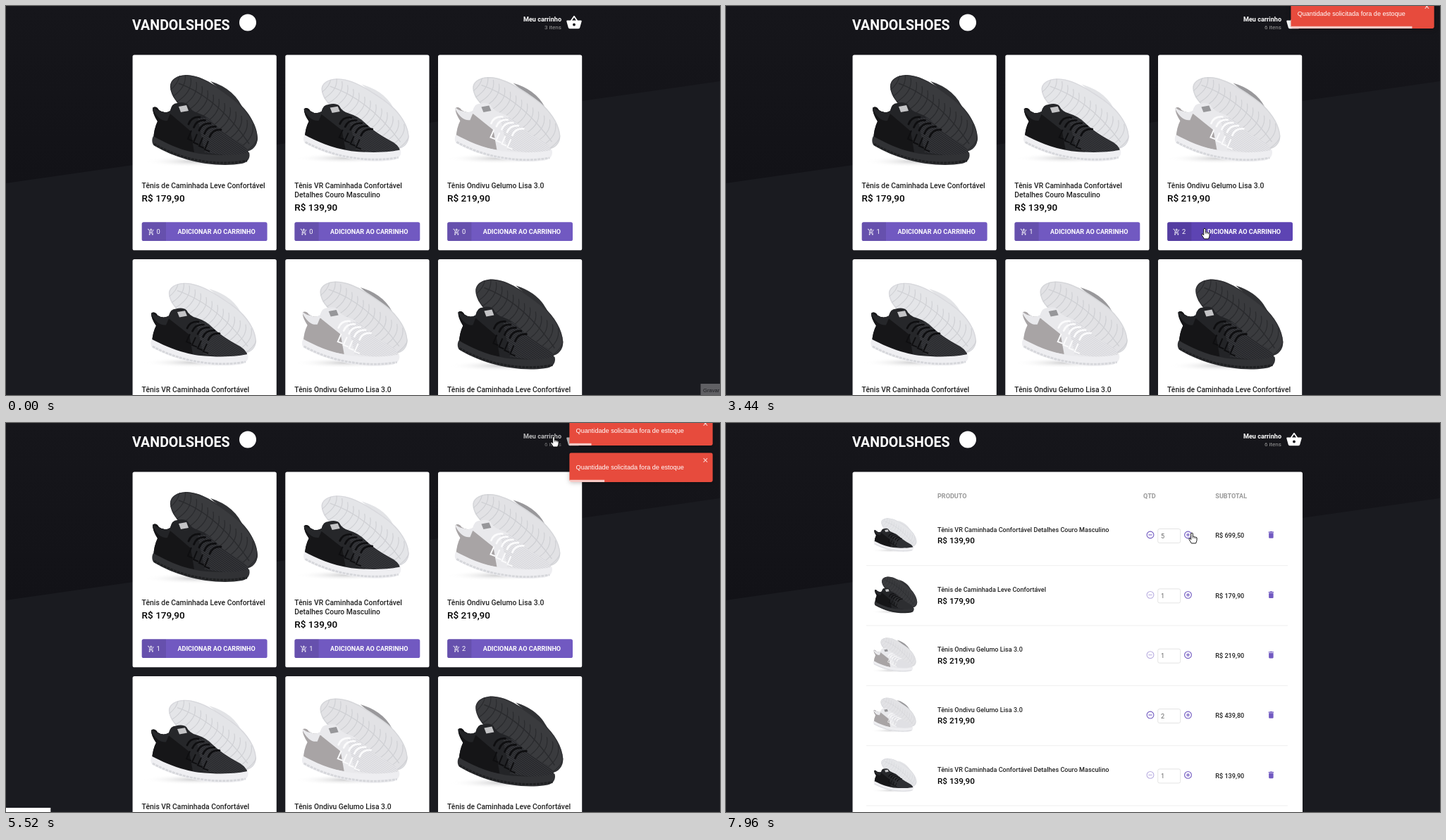
Write an HTML page that moves like this. It is 1013x553 px and loops after 8 s.

```html
<!DOCTYPE html>
<html lang="pt-BR">
<head>
<meta charset="utf-8">
<title>Loja de tênis</title>
<style>
  html, body { margin: 0; width: 100%; height: 100%; overflow: hidden; background: #1a1b20; }
  svg { display: block; width: 100vw; height: 100vh; }
  text { font-family: Roboto, sans-serif; white-space: pre; }
  .plain { font-family: "Liberation Sans", Arial, sans-serif; }
  .black { --sole: #3a3b3e; --groove: #2a2b2e; --edge: #303134; --upper: #232427; --panel: #151517; --mid: #313235; --tread: #1f2022; --lace: #0e0e10; --label: #c4c4c6; }
  .mixed { --sole: #e4e5e8; --groove: #d0d1d5; --edge: #e2e3e6; --upper: #26272a; --panel: #161618; --mid: #efeff2; --tread: #d6d7db; --lace: #0e0e10; --label: #c4c4c6; }
  .white { --sole: #e2e2e5; --groove: #cfd0d4; --edge: #99989b; --upper: #e9e9ec; --panel: #a8a4a5; --mid: #eeeef1; --tread: #d6d7db; --lace: #fbfbfc; --label: #97979a; }
</style>
</head>
<body>
<svg id="stage" viewBox="0 0 1013 553" preserveAspectRatio="none"></svg>
<script>
const LOOP = 8000, PURPLE = '#7159c1', PURPLE_HOVER = '#5d44b3';
const CARD_X = [180, 396.7, 613.4];
const $ = id => document.getElementById(id);
const repeat = (n, draw) => Array.from({ length: n }, (_, i) => draw(i)).join('');
const text = (x, y, value, size, { weight = 400, fill = '#222', more = '' } = {}) =>
  `<text x="${x}" y="${y}" font-size="${size}" font-weight="${weight}" fill="${fill}" ${more}>${value}</text>`;

// "photo" is the framing of the shoe inside its picture
const products = {
  black: { lines: ['Tênis de Caminhada Leve Confortável'], price: 'R$ 179,90', photo: '' },
  mixed: { lines: ['Tênis VR Caminhada Confortável', 'Detalhes Couro Masculino'], price: 'R$ 139,90', photo: 'translate(-2 13) scale(1 .92)' },
  white: { lines: ['Tênis Ondivu Gelumo Lisa 3.0'], price: 'R$ 219,90', photo: 'translate(-4 9) scale(1 .94)' },
};

const soleShape = 'M233 116C232 105 242 98 257 98C280 99 303 117 322 131C342 146 356 168 357 187C357 198 350 206 340 207C310 198 280 178 262 158C246 140 235 132 233 116Z';
const upperShape = 'M208 145Q213 141 217 148Q225 154 233 149Q235 138 243 138Q253 135 258 140Q262 149 272 152Q287 157 296 168Q310 182 329 193Q343 200 345 211L338 216Q270 222 209 190Q210 174 215 164Q208 153 208 145Z';

const defs = `<defs>
  <linearGradient id="top" x2="0" y2="1"><stop stop-color="#16161b"/><stop offset="1" stop-color="#121217"/></linearGradient>
  <radialGradient id="shade"><stop stop-color="#55555a" stop-opacity=".28"/><stop offset="1" stop-color="#fff" stop-opacity="0"/></radialGradient>
  <pattern id="mesh" width="2.4" height="2.4" patternUnits="userSpaceOnUse" patternTransform="rotate(35)">
    <path d="M0 1H2.4" stroke="#888b90" stroke-width=".7" opacity=".35"/></pattern>
  <clipPath id="soleClip"><path d="${soleShape}"/></clipPath>
  <clipPath id="upperClip"><path d="${upperShape}"/></clipPath>
  <filter id="drop" x="-10%" y="-30%" width="120%" height="170%"><feDropShadow dx="0" dy="1" stdDeviation="3" flood-opacity=".25"/></filter>
  <g id="shoe" fill="none">
    <ellipse cx="268" cy="221" rx="72" ry="8" fill="url(#shade)"/>
    <path d="M290 107Q326 118 338 150Z" fill="var(--edge)"/>
    <path d="${soleShape}" fill="var(--sole)"/>
    <g clip-path="url(#soleClip)" stroke="var(--groove)">
      ${repeat(17, i => `<path d="M${246 + i * 8} ${90 + i * 6}q4 22-26 38" stroke-width="1.2"/>`)}
      <path d="M245 110Q300 130 345 196" stroke-width="1.4"/>
      <path d="${soleShape}" stroke-width="3" opacity=".6"/>
    </g>
    <path d="${upperShape}" fill="var(--upper)"/>
    <g clip-path="url(#upperClip)">
      <path d="M272 160L290 158L350 205L338 216L282 208Z" fill="url(#mesh)"/>
      <path d="M205 140L234 154L262 178L267 208L200 195Z" fill="var(--panel)"/>
      <path d="M206 142Q220 156 236 145L229 163Q216 165 206 142Z" fill="var(--upper)"/>
      ${repeat(4, i => `<path d="M${263 + i * 8} ${177 + i * 5}l-5 12l7 3" stroke="var(--lace)" stroke-width="2"/>`)}
    </g>
    ${repeat(5, i => `<path d="M${259 + i * 7.5} ${168 + i * 4.5}q4-11 16-10" stroke="var(--lace)" stroke-width="2.8" stroke-linecap="round"/>`)}
    <path d="M245 143l11-2 3 8-11 2Z" fill="var(--label)"/>
    <path d="M209 185C225 194 246 205 275 210C310 214 335 211 345 208C347 215 344 222 335 224C300 230 250 222 211 199C206 196 207 188 209 185Z" fill="var(--mid)"/>
    <path d="M210 196C250 220 300 228 342 220" stroke="var(--tread)" stroke-width="3" stroke-dasharray="4 1.2"/>
  </g>
  <g id="cart" fill="none" stroke="#fff" stroke-width="2">
    <path d="M1 3H4L8.3 12H16L20.3 4.4M8 12L6 16H19M12 1V9M8 5H16"/>
    <g fill="#fff" stroke="none"><circle cx="7" cy="20" r="2"/><circle cx="17" cy="20" r="2"/></g>
  </g>
  <g id="trash" fill="${PURPLE}"><path d="M6 7H18V19Q18 21 16 21H8Q6 21 6 19ZM5 4H8.5L9.5 3H14.5L15.5 4H19V6H5Z"/></g>
  <g id="ring" fill="none" stroke="${PURPLE}" stroke-width="1.1"><circle r="4.9"/><path d="M-2.6 0H2.6"/></g>
</defs>`;

const header = `
  ${text(179, 34, 'VANDOLSHOES', 19.6, { weight: 700, fill: '#fff' })}
  <circle cx="343" cy="23.5" r="12" fill="#fff"/>
  <g id="cartLink">
    ${text(788, 21.8, 'Meu carrinho', 9.05, { weight: 700, fill: '#fff', more: 'text-anchor="end"' })}
    ${text(788, 32.5, '', 8.1, { fill: '#999', more: 'text-anchor="end" id="items"' })}
    <path transform="translate(794.3 11.8) scale(.975)" fill="#fff" fill-rule="evenodd"
      d="M17.2 9L12.8 2.4Q12 1.6 11.2 2.4L6.8 9H2Q1 9 1 10.3L3.6 19.5Q4 21 5.5 21H18.5Q20 21 20.4 19.5L23 10.3Q23 9 22 9ZM9 9L12 4.6L15 9ZM12 17A2 2 0 1 1 12 13A2 2 0 1 1 12 17Z"/>
  </g>`;

const shoe = (kind, place) =>
  `<g transform="${place}"><use href="#shoe" class="${kind}" transform="${products[kind].photo}"/></g>`;

function card(kind, i) {
  const x = CARD_X[i % 3], y = i < 3 ? 70 : 360.5;
  const { lines, price } = products[kind];
  const shift = (lines.length - 1) * 13;
  return `<g transform="translate(${x} ${y})">
    <rect x="-.4" y="-.5" width="204.2" height="277.8" rx="2.6" fill="#fff"/>
    ${shoe(kind, 'translate(-180 -70)')}
    ${lines.map((line, n) => text(12.6, 188.7 + n * 13, line, 10.35, { weight: 500 })).join('')}
    ${text(12.6, 208.2 + shift, price, 13.55, { weight: 500, fill: '#000' })}
    <rect id="button${i}" x="12.7" y="237.3" width="177.9" height="26.8" rx="2.6" fill="${PURPLE}"/>
    <path d="M15.3 237.3H47V264.1H15.3Q12.7 264.1 12.7 261.5V239.9Q12.7 237.3 15.3 237.3Z" opacity=".1"/>
    <use href="#cart" transform="translate(20.6 246) scale(.433)"/>
    ${text(33.6, 254, '0', 9.3, { fill: '#fff', more: `id="count${i}"` })}
    ${text(118.6, 254, 'ADICIONAR AO CARRINHO', 9.1, { weight: 700, fill: '#fff', more: 'text-anchor="middle"' })}
  </g>`;
}

function cartRow([kind, amount, subtotal], i) {
  const { lines, price } = products[kind];
  return `<g transform="translate(0 ${i * 85.35})">
    ${shoe(kind, 'translate(240.5 159.5) scale(.405) translate(-281 -163)')}
    ${text(300, 154.5, lines.join(' '), 9.1, { weight: 500 })}
    ${text(300, 171.4, price, 11.75, { weight: 500, fill: '#000' })}
    <use href="#ring" x="602" y="159" opacity="${amount > 1 ? 1 : .5}"/>
    <rect x="612.7" y="150.5" width="32" height="20" rx="2.4" fill="#fff" stroke="#ddd" stroke-width=".8"/>
    ${text(617, 163.7, amount, 9.1, { fill: '#666' })}
    <use href="#ring" x="655.5" y="159"/><path d="M655.5 156.4v5.2" stroke="${PURPLE}" stroke-width="1.1"/>
    ${text(694.3, 163.4, subtotal, 9.1, { weight: 500 })}
    <use href="#trash" transform="translate(766.9 152.4) scale(.54)"/>
    <path d="M199 202.6H797" stroke="#eee" stroke-width=".9"/>
  </g>`;
}

const cartRows = [
  ['mixed', 5, 'R$ 699,50'], ['black', 1, 'R$ 179,90'], ['white', 1, 'R$ 219,90'],
  ['white', 2, 'R$ 439,80'], ['mixed', 1, 'R$ 139,90'],
];
const columnTitle = { weight: 700, fill: '#999' };
const cartPage = `<rect x="179.6" y="69.5" width="638.4" height="500" rx="2.6" fill="#fff"/>
  ${text(300, 107, 'PRODUTO', 9.1, columnTitle)}${text(592, 107, 'QTD', 9.1, columnTitle)}${text(694.3, 107, 'SUBTOTAL', 9.1, columnTitle)}
  ${cartRows.map(cartRow).join('')}`;

const toast = (id, y) => `<g id="${id}"><g transform="translate(799.4 ${y})">
    <rect width="203.2" height="41.6" rx="2.4" fill="#e74c3c" filter="url(#drop)"/>
    ${text(9.2, 24, 'Quantidade solicitada fora de estoque', 9.1, { fill: '#fff', more: 'class="plain"' })}
    <path d="M190.2 7.8l5.4 5.4m0-5.4l-5.4 5.4" stroke="#fff" stroke-width="1.1" opacity=".75"/>
    <rect id="${id}Bar" y="38.4" height="3.2" fill="#fff" opacity=".7"/>
  </g></g>`;

$('stage').innerHTML = `${defs}
  <rect width="1013" height="553" fill="#1a1b20"/>
  <path d="M0 0H1013V107L0 252Z" fill="url(#top)"/>
  ${header}
  <g id="shop">${['black', 'mixed', 'white', 'mixed', 'white', 'black'].map(card).join('')}</g>
  <g id="cartPage">${cartPage}</g>
  ${toast('toastA', -9.6)}${toast('toastB', 42.4)}
  <rect id="status" y="547" width="63.3" height="6" fill="#fff"/>
  <g id="tip"><rect x="985.5" y="537" width="28" height="16" fill="#606064"/>
    ${text(989, 549, 'Gravar', 7.6, { fill: '#1c1c20', more: 'class="plain"' })}</g>
  <g id="cursor" stroke-linejoin="round">
    <path id="arrow" d="M0 0V10.2L2.4 8L4 11.7L5.6 11L4 7.4H7.2Z" fill="#fff" stroke="#000" stroke-width=".8"/>
    <g id="hand"><path d="M-1.3 1Q0-.8 1.3 1V5.5Q2.5 4.6 3.5 5.9Q4.7 5.2 5.5 6.6Q7 6.2 7.2 7.8Q7.4 11.5 5.6 15H-.6Q-2.4 12-4 9.6Q-4.4 7.8-3 7.9L-1.3 9.6Z" fill="#fff" stroke="#000" stroke-width=".9"/>
      <path d="M1.3 5.5V8M3.5 6V8.2M5.5 6.6V8.4" stroke="#000" stroke-width=".6"/></g>
  </g>`;

// Cursor stops: time, x, y
const path = [
  [80, 1005, 542], [560, 715, 318], [920, 715, 318], [1200, 520, 318], [1480, 520, 318],
  [1740, 300, 317], [2000, 300, 317], [2280, 602, 418], [2440, 652, 358], [2700, 679, 316],
  [3820, 679, 316], [4200, 777, 19], [6860, 777, 19], [7300, 480, 165], [7540, 463, 188], [7860, 661, 156],
];
const clamp = v => Math.min(1, Math.max(0, v));
const smooth = p => p * p * (3 - 2 * p);
const easeOut = p => 1 - (1 - p) ** 3;

function tween(stops, t, ease) {
  const next = stops.findIndex(s => s[0] > t);
  if (next === 0) return stops[0].slice(1);
  if (next < 0) return stops[stops.length - 1].slice(1);
  const a = stops[next - 1], b = stops[next];
  const p = ease((t - a[0]) / (b[0] - a[0]));
  return a.slice(1).map((v, i) => v + (b[i + 1] - v) * p);
}

const show = (id, on) => { $(id).style.display = on ? '' : 'none'; };
const inside = (x, y, left, top, width, height) => x >= left && x <= left + width && y >= top && y <= top + height;

function drawToast(id, age) {
  const life = 3000, move = 700;
  const on = age >= 0 && age < life + move;
  show(id, on);
  if (!on) return;
  const [x] = age < life
    ? tween([[0, 3000], [.6, -25], [.75, 10], [.9, -5], [1, 0]], age / move, easeOut)
    : tween([[0, 0], [.2, -20], [1, 2000]], (age - life) / move, easeOut);
  $(id).setAttribute('transform', `translate(${x} 0)`);
  $(id).setAttribute('opacity', 1 - clamp(x / 2500));
  $(id + 'Bar').setAttribute('width', 203.2 * clamp(1 - age / life));
}

function render(t) {
  const inCart = t >= 6680;
  const [x, y] = tween(path, t, smooth);
  const overLink = inside(x, y, 732, 10, 86, 26);
  const overPlus = inCart && inside(x, y, 649, 152, 13, 14);
  const hovered = inCart ? -1 : CARD_X.findIndex(left => inside(x, y, left + 12.9, 307.5, 177.7, 26.5));
  const counts = [+(t >= 1900), +(t >= 1360), (t >= 700) + (t >= 2800)];

  show('shop', !inCart);
  show('cartPage', inCart);
  counts.forEach((n, i) => {
    $('count' + i).textContent = n;
    $('button' + i).setAttribute('fill', hovered === i ? PURPLE_HOVER : PURPLE);
  });
  $('items').textContent = 3 + counts.filter(n => n > 0).length + ' itens';
  $('cartLink').setAttribute('opacity', overLink ? .7 : 1);

  drawToast('toastA', t - 2980);
  drawToast('toastB', t - 3255);

  $('status').setAttribute('opacity', clamp((t - 4200) / 230) * clamp((7100 - t) / 150));
  $('tip').setAttribute('opacity', clamp((240 - t) / 160));

  const pointing = overLink || overPlus || hovered >= 0;
  show('cursor', t >= 80);
  show('hand', pointing);
  show('arrow', !pointing);
  $('cursor').setAttribute('transform', `translate(${x} ${y})`);
}

(function tick() {
  render(performance.now() % LOOP);
  requestAnimationFrame(tick);
})();
</script>
</body>
</html>
```
